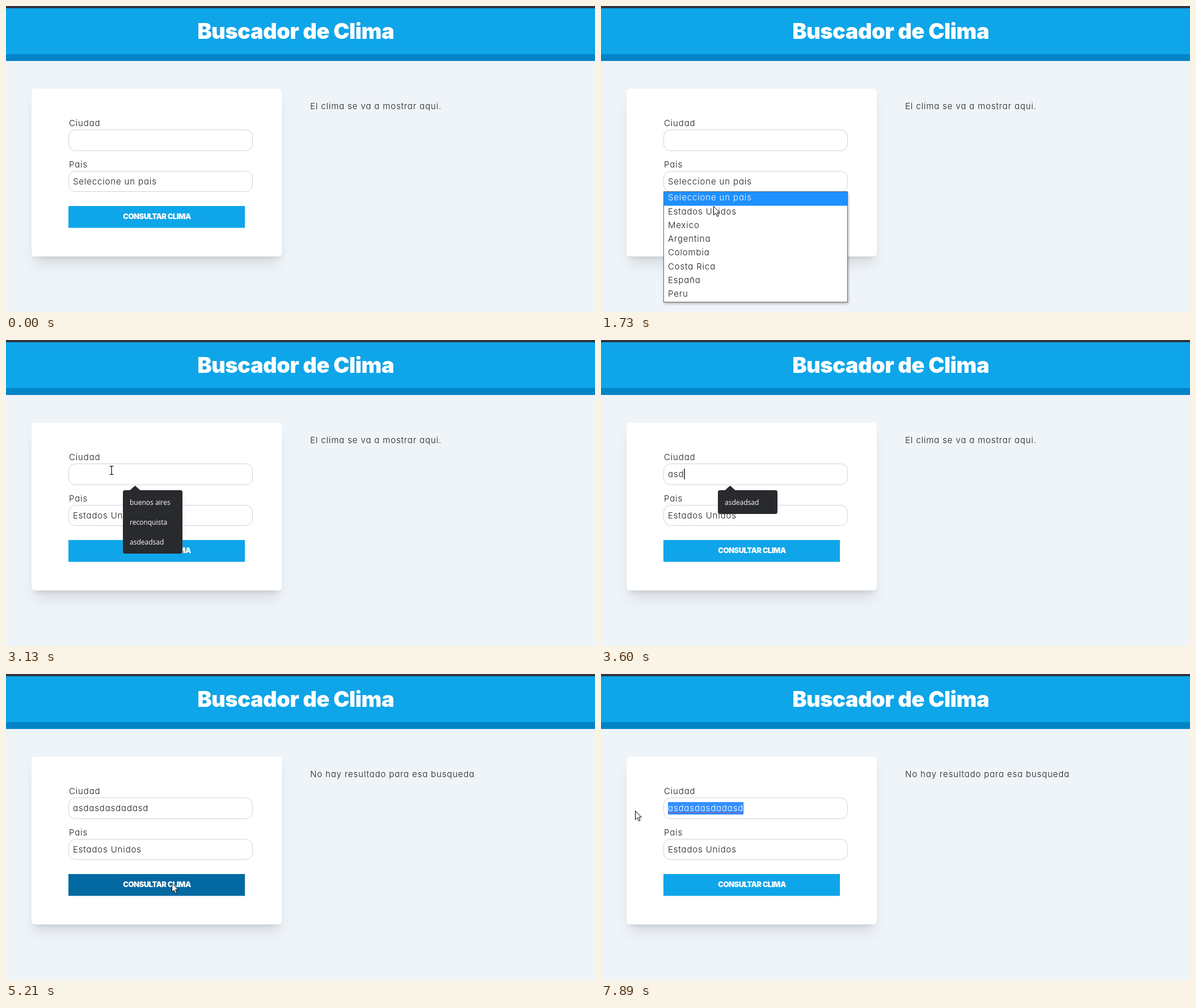
These frames come from a looping animation (1038x540 px, 8 s). An HTML page:

```html
<!DOCTYPE html>
<html lang="es">
<head>
<meta charset="utf-8">
<title>Buscador de Clima</title>
<style>
  html, body { margin: 0; width: 100%; height: 100%; overflow: hidden; background: #eff4f9; }
  svg { position: absolute; left: 0; top: 0; }
  text { font: 300 15px Inter, sans-serif; font-feature-settings: "cv11"; letter-spacing: .85px; fill: #1c1c1f; white-space: pre; }
  .title, .action { font-feature-settings: normal; font-weight: 900; fill: #fff; text-anchor: middle; }
  .title { font-size: 38px; letter-spacing: -.5px; }
  .action { font-size: 13px; letter-spacing: -.5px; }
  #card { position: absolute; left: 45px; top: 146px; width: 441px; height: 296px; border-radius: 6px; background: #fff;
    box-shadow: 0 18px 23px -5px rgba(0, 0, 0, .1), 0 7px 9px -5px rgba(0, 0, 0, .1); }
  .field { fill: #fff; stroke: #cbd5e1; }
  #menu { filter: drop-shadow(1px 2px 2px rgba(0, 0, 0, .3)); }
  #hints text { font: 400 12px "Open Sans", sans-serif; letter-spacing: 0; fill: #fff; }
</style>
</head>
<body>
<div id="card"></div>
<svg width="1038" height="540">
  <rect width="1038" height="97" fill="#0284c7"/>
  <rect width="1038" height="85" fill="#0ea5e9"/>
  <rect width="1038" height="4" fill="#30353f"/>
  <text class="title" x="510.5" y="58">Buscador de Clima</text>

  <text x="111" y="212">Ciudad</text>
  <rect class="field" x="110.5" y="218.5" width="324" height="37" rx="12"/>
  <rect id="mark" y="226" height="22" fill="#3390ff"/>
  <text id="city" x="118" y="242"><tspan id="plain"></tspan><tspan id="picked" fill="#fff"></tspan></text>
  <path id="squiggle" fill="none" stroke="#d8304a" stroke-opacity=".75"/>
  <rect id="caret" y="227" width="1.3" height="19" fill="#000"/>

  <text x="111" y="285">Pais</text>
  <rect class="field" x="110.5" y="291.5" width="324" height="36" rx="12"/>
  <text id="country" x="118" y="315"></text>

  <rect id="button" x="110" y="353" width="311" height="38.5"/>
  <text class="action" x="266" y="376">CONSULTAR CLIMA</text>
  <text id="result" x="536" y="182"></text>

  <g id="menu">
    <rect x="110.5" y="327.5" width="324" height="195" fill="#fff" stroke="#6b6b6b"/>
    <rect id="hover" x="111" width="323" height="24.5" fill="#1e90ff"/>
  </g>
  <g id="hints">
    <path d="M218 265.5L227.5 257L237 265.5z" fill="#292a2d"/>
    <rect id="hintBox" x="206" y="265" width="105" rx="4" fill="#292a2d"/>
  </g>

  <g id="pointer">
    <path id="arrow" d="M.5 .5V16L4.1 12.7 6.6 18.4 9 17.4 6.6 11.7H11.3z" fill="#fff" stroke="#000"/>
    <path id="beam" d="M-3.5 -7.5H-1L0 -6.5 1 -7.5H3.5M0 -6.5V6.5M-3.5 7.5H-1L0 6.5 1 7.5H3.5" fill="none" stroke="#000" stroke-width="1.2"/>
  </g>
</svg>
<script>
const LOOP = 8000;
const $ = id => document.getElementById(id);
const show = (id, on) => { $(id).style.display = on ? '' : 'none'; };
const set = (id, name, value) => $(id).setAttribute(name, value);
const clamp = v => Math.max(0, Math.min(1, v));

function addText(parent, x, y, words) {
  const node = document.createElementNS('http://www.w3.org/2000/svg', 'text');
  node.setAttribute('x', x);
  node.setAttribute('y', y);
  node.textContent = words;
  $(parent).append(node);
  return node;
}

const CITY = 'asdasdasdadasd';
const countries = ['Seleccione un pais', 'Estados Unidos', 'Mexico', 'Argentina', 'Colombia', 'Costa Rica', 'España', 'Peru'];
const rows = countries.map((name, i) => addText('menu', 118, 343.4 + 24.25 * i, name));
const hints = ['buenos aires', 'reconquista', 'asdeadsad'].map((word, i) => addText('hints', 218, 290.5 + 35 * i, word));

// Pointer path: time, x, y
const path = [
  [460, 655, 440], [700, 470, 372], [900, 265, 318], [1070, 199, 306],
  [1540, 199, 306], [1730, 198, 353], [1860, 198, 360],
  [2060, 198, 360], [2250, 190, 285], [2450, 186, 230],
  [4150, 186, 230], [4350, 292, 335], [4420, 292, 338], [4640, 292, 369],
  [5810, 292, 369], [5950, 400, 376], [6150, 575, 293], [6280, 581, 268], [6420, 541, 249], [6550, 425, 251],
  [6620, 415, 251], [7010, 312, 251], [7280, 312, 251], [7750, 52, 239], [7889, 52, 239], [7890, 60, 241]
];

function pointerAt(t) {
  const next = path.findIndex(p => p[0] > t);
  if (next < 0) return path.at(-1).slice(1);
  if (next === 0) return path[0].slice(1);
  const [t0, x0, y0] = path[next - 1], [t1, x1, y1] = path[next];
  const k = (t - t0) / (t1 - t0);
  return [x0 + (x1 - x0) * k, y0 + (y1 - y0) * k];
}

function drawCity(t, x) {
  const typed = Math.floor(14 * clamp((t - 3300) / 1190));
  const dragging = t >= 7280;
  $('plain').textContent = CITY.slice(0, typed);
  $('picked').textContent = '';
  const width = n => n ? $('city').getSubStringLength(0, n) : 0;
  const full = width(typed);

  const kept = dragging ? Math.round(typed * clamp((x - 118) / full)) : typed;
  const start = width(kept);
  set('mark', 'x', 118 + start);
  set('mark', 'width', full - start);
  $('plain').textContent = CITY.slice(0, kept);
  $('picked').textContent = CITY.slice(kept, typed);

  show('squiggle', dragging);
  set('squiggle', 'd', 'M118 244.5' + 'q1 -2 2 0t2 0'.repeat(Math.floor(full / 4)));

  const blink = t < 3300 ? t - 2590 : t - 4490;
  const lit = blink < 0 || t >= 3300 && t < 4490 || blink % 1000 < 500;
  show('caret', t >= 2590 && t < 4880 && lit);
  set('caret', 'x', 118 + full);
  return typed;
}

function drawHints(t, typed) {
  show('hints', t >= 2590 && typed < 4);
  $('hints').style.opacity = clamp((t - 2520) / 270);
  const filtered = typed > 0;
  set('hintBox', 'height', filtered ? 42 : 112);
  hints.forEach((node, i) => { node.style.display = filtered && i < 2 ? 'none' : ''; });
  hints[2].setAttribute('y', filtered ? 290.5 : 360.5);
}

function drawMenu(t) {
  show('menu', t >= 1140 && t < 2000);
  const active = t < 1790 ? 0 : 1;
  set('hover', 'y', 328 + 24.25 * active);
  rows.forEach((row, i) => { row.style.fill = i === active ? '#fff' : ''; });
  $('country').textContent = countries[t < 2000 ? 0 : 1];
}

function drawPointer(t, x, y) {
  const inField = x > 111 && x < 435 && y > 218 && y < 256;
  const beam = inField || t >= 7280 && t < 7890;
  show('pointer', t >= 460 && (t < 3200 || t >= 4150));
  show('beam', beam);
  show('arrow', !beam);
  set('pointer', 'transform', `translate(${x} ${y})`);
}

function draw() {
  const t = performance.now() % LOOP;
  const [x, y] = pointerAt(t);
  const overButton = t > 4150 && x > 110 && x < 421 && y > 353 && y < 392;
  set('button', 'fill', overButton ? '#0369a1' : '#0ea5e9');
  $('result').textContent = t < 4950 ? 'El clima se va a mostrar aqui.' : t < 5210 ? '' : 'No hay resultado para esa busqueda';
  drawHints(t, drawCity(t, x));
  drawMenu(t);
  drawPointer(t, x, y);
  requestAnimationFrame(draw);
}
draw();
</script>
</body>
</html>
```
